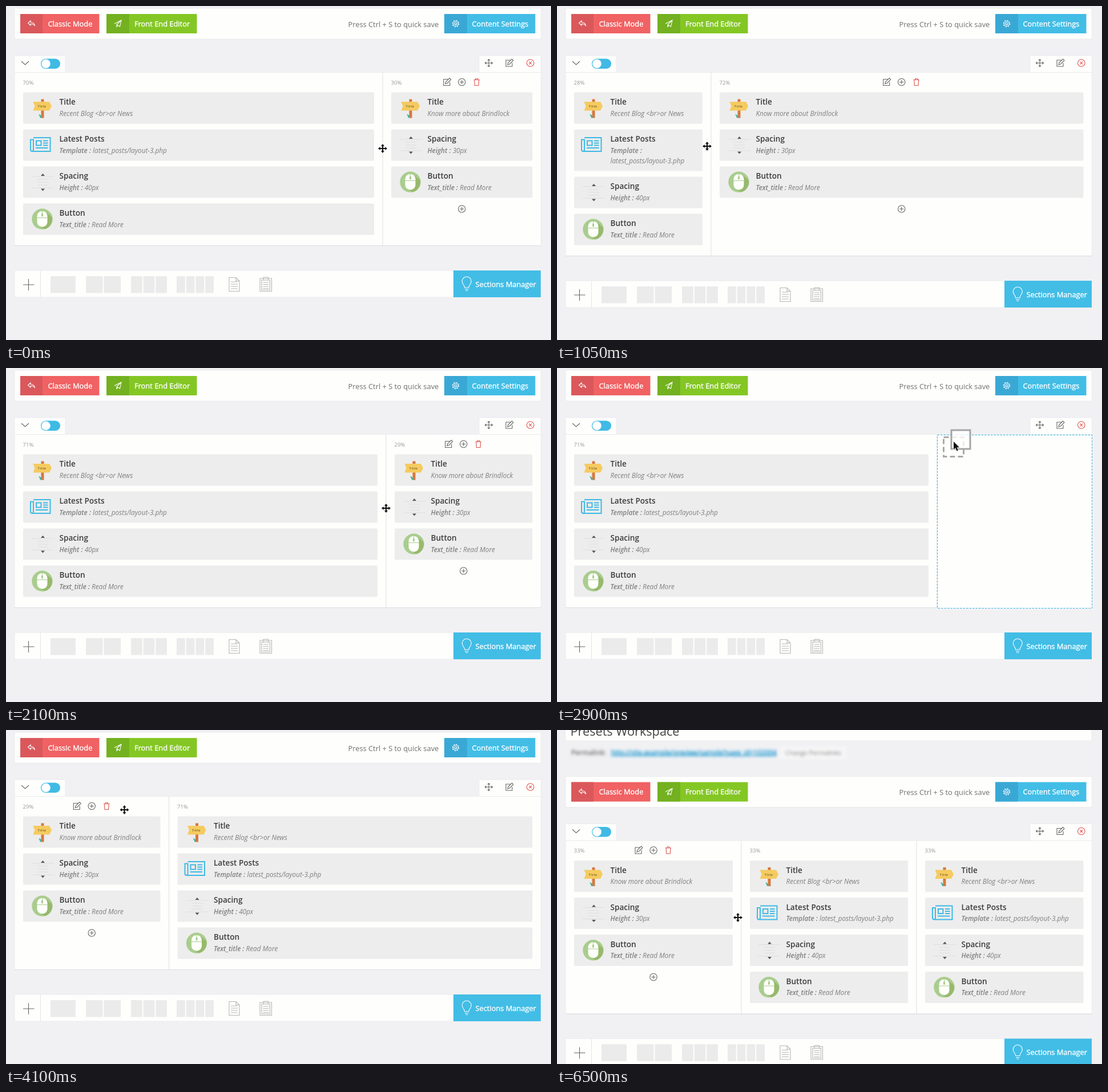
Animation of 955x586 px, one loop 6550 ms. Source, as an HTML page:

```html
<!DOCTYPE html>
<html lang="en">
<head>
<meta charset="utf-8">
<title>Section builder</title>
<style>
html, body { margin: 0; width: 100%; height: 100%; overflow: hidden; background: #f1f1f4; }
svg { display: block; width: 955px; height: 586px; font: 12.85px "Open Sans", sans-serif; }
.panel { fill: #fefefd; stroke: #ebebee; }
.line { fill: none; stroke: #666; stroke-width: 1.1; }
.white { stroke: #fff; }
.red { stroke: #e0544f; }
.pale { stroke: #b5b5b5; }
.label { fill: #fff; stroke: #fff; stroke-width: .35; }
.name { font-size: 13.6px; font-weight: 600; fill: #3c3c3e; }
.note { font-size: 11.75px; font-style: italic; fill: #808080; }
.note tspan { font-weight: 600; }
.note .value { font-weight: 400; }
.share { font-size: 9.6px; fill: #999; }
.cursor { stroke: #fff; stroke-width: 1.6; paint-order: stroke; fill: #111; }
</style>
</head>
<body>
<svg viewBox="0 0 955 586">
  <defs>
    <filter id="blur" x="-10%" y="-80%" width="120%" height="260%"><feGaussianBlur stdDeviation="2.4"/></filter>
    <path id="edit" class="line" d="M2-5H-6V6H5V0M-3 3L-2-.5 4.5-7 7-4.5 .5 2Z"/>
    <g id="add" class="line"><circle r="6.2"/><path d="M-3.5 0H3.5M0-3.5V3.5"/></g>
    <path id="trash" class="line red" d="M-5-4H5M-2-4V-6H2V-4M-4-4L-3.3 6H3.3L4-4"/>
    <path id="arrows" class="line" d="M-6.5 0H6.5M0-6.5V6.5M-2-4.5L0-6.5 2-4.5M-2 4.5L0 6.5 2 4.5M-4.5-2L-6.5 0-4.5 2M4.5-2L6.5 0 4.5 2"/>

    <!-- item icons, placed from the item's top left corner -->
    <g id="sign">
      <path fill="#d6783e" d="M31.5 12h5v33h-5z"/>
      <path fill="#f5cb60" d="M17.5 16.5H46L50 24 46 32H17.5L20.5 24Z"/>
      <path fill="#42b3a0" d="M27 38l4 2 2 4-3 1-1-3z"/>
      <text x="25.5" y="26.7" font-size="6" font-weight="600" fill="#785d28" letter-spacing=".5">Title</text>
    </g>
    <g id="news" fill="none" stroke="#3fb9e5" stroke-width="2">
      <path d="M18 14.5H47.5V38.5H16Q13 38.5 13 35.5V18H18V35.5Q18 38.5 15.5 38.5"/>
      <path d="M23 20H31.500V28H23ZM35 20H43.500M35 24H43.500M35 28H43.500M22 32.500H43.500"/>
    </g>
    <g id="gap">
      <path stroke="#dededf" d="M15 17.5H54M25 22.5H44M25 27.5H44M25 32.5H44M15 37.5H54"/>
      <path fill="#555" d="M31 16.5L34.5 12.5 38 16.5ZM31 39L34.5 43 38 39Z"/>
    </g>
    <g id="mouse">
      <circle cx="33.5" cy="27.3" r="18.2" fill="#a9cd8e"/>
      <path fill="#97b96c" d="M41 16L50.5 24A18.2 18.2 0 0 1 38 45L27 39Z"/>
      <rect x="24.5" y="13.5" width="18" height="27.5" rx="8.5" fill="#fefefa"/>
      <path fill="none" stroke="#a9cd8e" d="M33.5 13.5V18M24.5 25H42.5"/>
      <rect x="32" y="17" width="3" height="6" rx="1.5" fill="#a9cd8e"/>
    </g>

    <!-- pointers -->
    <path id="move" class="cursor" d="M0-8L3-4.3H1.1V-1.1H4.3V-3L8 0 4.3 3V1.1H1.1V4.3H3L0 8-3 4.3H-1.1V1.1H-4.3V3L-8 0-4.3-3V-1.1H-1.1V-4.3H-3Z"/>
    <g id="hand" stroke="#222" stroke-width="1.2">
      <path fill="#fff" d="M-4-7Q-2.5-9-1-7V-2L5-1Q7 0 6.5 4L5 9H-2L-6.5 2Q-6.5-.5-4 1Z"/>
      <path d="M-1-2V2M1.500-1.500V2M4-1V2M-1 4.500V7M1.500 4.500V7M4 4.500V7"/>
    </g>
    <g id="drag">
      <rect x="-19.5" y="-15.5" width="35" height="34" fill="none" stroke="#aaa" stroke-width="3" stroke-dasharray="9 5"/>
      <rect x="-6" y="-28" width="33" height="33" fill="#fff" fill-opacity=".8" stroke="#a5a5a5" stroke-width="3"/>
      <path class="cursor" d="M-2-8V6L1.2 3 3.5 8.5 6 7.4 3.7 2.2H8Z"/>
    </g>
  </defs>

  <g id="page">
    <rect class="panel" x="14.5" y="-100" width="922.5" height="41.5"/>
    <text x="23.5" y="-68" font-size="21.7" fill="#444">Presets Workspace</text>
    <g filter="url(#blur)" font-size="11.8">
      <rect x="390" y="-49" width="117" height="23" fill="#f6f6f7"/>
      <text x="25" y="-34" font-weight="600" fill="#666">Permalink:</text>
      <text x="95" y="-34" fill="#239bd0" stroke="#239bd0" stroke-width=".5" text-decoration="underline">http://site.example/preview/sample?page_id=102004</text>
      <text x="400" y="-34" font-size="11" fill="#666">Change Permalinks</text>
    </g>

    <rect class="panel" x="15" y="4" width="922.5" height="54"/>
    <path fill="#f06263" d="M25 14h138.5v34H25z"/><path fill="#da585b" d="M25 14h39v34H25z"/>
    <path fill="#84c724" d="M176 14h158.5v34H176z"/><path fill="#73b120" d="M176 14h40v34h-40z"/>
    <path fill="#42bde6" d="M768 14h159.5v34H768z"/><path fill="#3aa8d5" d="M768 14h40v34h-40z"/>
    <path class="line white" d="M43 26L38.5 30 43 34V31.5Q48 31 50.5 35 50 29 43 28.5Z"/>
    <path class="line white" d="M190 31L202 25 199.5 36 195.5 33.5 194 37V32.5L202 25"/>
    <g class="line white"><circle cx="788" cy="31" r="2"/><circle cx="788" cy="31" r="4.5"/><circle cx="788" cy="31" r="5.8" stroke-dasharray="2 2.55"/></g>
    <g class="label">
      <text x="73.5" y="35.5">Classic Mode</text>
      <text x="225" y="35.5">Front End Editor</text>
      <text x="816.5" y="35.5">Content Settings</text>
    </g>
    <text x="599.5" y="36.5" fill="#707070">Press Ctrl + S to quick save</text>

    <g id="section"></g>

    <g id="footer">
      <rect class="panel" x="15" y="464" width="922" height="47"/>
      <path stroke="#e6e6e8" d="M60.5 464V511"/>
      <path class="line" d="M30 489H49.5M39.5 479V499"/>
      <g id="layouts" fill="#ebebeb"></g>
      <path class="line pale" d="M391 476.5H403L409 482.5V500.5H391ZM403 476.5V482.5H409M394 484H405M394 488H406M394 492H406M394 496H406"/>
      <path class="line pale" d="M445 478H465.5V500.5H445ZM448 481H462.5V498H448ZM451 476H459.5V481H451ZM450.5 485H460M450.5 488.5H460M450.5 492H460M450.5 495.5H460"/>
      <path fill="#42bde6" d="M784 464h153v47H784z"/>
      <path class="line white" d="M803.5 494Q803.5 491 801 488A8 8 0 1 1 813.5 488Q811 491 811 494ZM804 497H810.5M805.5 499.5H809"/>
      <text class="label" x="822.5" y="492.5">Sections Manager</text>
    </g>
  </g>
  <g id="pointer"></g>
</svg>
<script>
const LOOP = 6550, LEFT = 15, RIGHT = 937.5, TOP = 117;
const $ = id => document.getElementById(id);
const use = (id, x, y) => `<use href="#${id}" x="${x}" y="${y}"/>`;

const button = ['mouse', 'Button', 'Text_title', 'Read More'];
const posts = [
  ['sign', 'Title', '', 'Recent Blog &lt;br>or News'],
  ['news', 'Latest Posts', 'Template', 'latest_posts/layout-3.php'],
  ['gap', 'Spacing', 'Height', '40px'],
  button
];
const about = [
  ['sign', 'Title', '', 'Know more about Brindlock'],
  ['gap', 'Spacing', 'Height', '30px'],
  button
];

// [time, value, ...] rows, joined by straight lines
function along(rows, t) {
  const i = rows.findIndex(r => r[0] > t);
  if (i < 0) return rows[rows.length - 1].slice(1);
  if (!i) return rows[0].slice(1);
  const a = rows[i - 1], b = rows[i], k = (t - a[0]) / (b[0] - a[0]);
  return a.slice(1).map((v, n) => v + (b[n + 1] - v) * k);
}

const dividerPath = [[200, 660], [600, 480], [950, 290], [1050, 270], [1100, 263], [1250, 258],
  [1450, 290], [1650, 468], [1700, 488], [2050, 666]];
const pointerPath = [[2100, 666, 246], [2400, 666, 246], [2550, 697, 140], [2800, 697, 137],
  [2900, 697, 137], [3650, 190, 140], [3850, 190, 140], [4100, 207.5, 140], [4250, 207.5, 140],
  [4700, 150, 112], [5100, 76, 104], [5250, 76, 104], [5500, 123, 104], [5750, 123, 104],
  [6400, 300, 320], [6450, 317, 329]];

function item([icon, name, key, value], x, y, width) {
  const wrap = icon === 'news' && width < 268;
  const height = wrap ? 73 : 55;
  const tx = x + 63.5;
  const head = key && `<tspan>${key} :</tspan> `;
  const note = head + (wrap ? `<tspan class="value" x="${tx}" dy="18.5">${value}</tspan>` : value);
  return { height, html: `<rect x="${x}" y="${y}" width="${width}" height="${height}" rx="2" fill="#ededed"/>
    ${use(icon, x, y)}<text class="name" x="${tx}" y="${y + 21.5}">${name}</text>
    <text class="note" x="${tx}" y="${y + 41}">${note}</text>` };
}

function column(items, x0, x1, hover) {
  const mid = (x0 + x1) / 2;
  const share = Math.round((x1 - x0) / (RIGHT - LEFT) * 100);
  let y = 151.5;
  let html = `<text class="share" x="${x0 + 14.5}" y="137.5">${share}%</text>`;
  for (const entry of items) {
    const block = item(entry, x0 + 15, y, x1 - x0 - 30);
    html += block.html;
    y += block.height + 10;
  }
  if (hover) html += use('edit', mid - 26, 133.5) + use('add', mid, 133.5) + use('trash', mid + 26, 133.5) + use('add', mid, y + 9.5);
  return { html, bottom: y + 9.5 };
}

function header(open) {
  const extra = `<path class="line" d="M119 96.5H130M119 100.5H130M119 104.5H130M116 96.5H117.5M116 100.5H117.5M116 104.5H117.5
    M158 96H153V106H164V102M156 103Q157 97 164 97M161.5 94L165 97 161.5 100
    M191 94H196L200 98V106H191ZM196 94V98H200M203 97.5H208.5M205.7 95V100.5
    M236 96V94H241L245 98V104H241M233 96H238L241 99V106H233ZM238 96V99H241"/>`;
  return `<rect class="panel" x="15" y="87" width="${open ? 242 : 89}" height="30"/>
    <rect class="panel" x="829" y="87" width="108.5" height="30"/>
    <path class="line" d="M27 97L33.5 103 40 97"/>
    <rect x="61" y="92.5" width="34" height="17.5" rx="8.75" fill="#3fbae5"/><circle cx="70" cy="101.2" r="7.8" fill="#fff"/>
    ${use('arrows', 846, 100)}${use('edit', 882, 100)}
    <path class="line red" d="M912.5 100a6.3 6.3 0 1 0 12.6 0a6.3 6.3 0 1 0 -12.6 0M916.5 97.7L921.1 102.3M921.1 97.7L916.5 102.3"/>
    ${open ? extra : ''}`;
}

function draw(now) {
  const t = Math.floor(now % LOOP / 50) * 50;
  const dragging = t >= 2800 && t < 3850;
  const swapped = t >= 3300, tripled = t >= 5750;
  const divider = swapped ? 285.5 : t < 250 ? 660 : along(dividerPath, t)[0];
  const bounds = tripled ? [LEFT, 323, 630, RIGHT] : [LEFT, divider, RIGHT];
  const sets = tripled ? [about, posts, posts] : swapped ? [about, posts] : [posts, about];
  const hover = t < 2800 ? 1 : (t >= 3850 && t < 4700) || t >= 6450 ? 0 : -1;
  const held = dragging ? sets.indexOf(about) : -1;

  const cols = sets.map((set, i) => column(set, bounds[i], bounds[i + 1], i === hover));
  const bottom = Math.max(...cols.map(c => c.bottom));
  let html = header(t >= 4700 && t < 5750) +
    `<rect class="panel" x="15" y="${TOP - .5}" width="922.5" height="${bottom - TOP}"/>
     <path stroke="#dcdcdf" d="M15 ${bottom - .5}H937.5"/>`;
  cols.forEach((col, i) => {
    const x = bounds[i];
    if (i) html += `<path stroke="#e0e0e2" d="M${x} ${TOP}V${bottom}"/>`;
    if (i !== held) html += col.html;
  });
  if (held >= 0) html += `<rect x="${bounds[held] + .5}" y="117.5" width="${bounds[held + 1] - bounds[held] - .5}"
    height="${bottom - TOP}" fill="#fefefd" stroke="#36b7df" stroke-dasharray="3.5 2"/>`;
  $('section').innerHTML = html;

  const k = Math.min(1, Math.max(0, (t - 5900) / 300));
  $('page').setAttribute('transform', `translate(0 ${77.5 * k * k * (3 - 2 * k)})`);
  $('footer').setAttribute('transform', `translate(0 ${bottom - 421})`);

  const [x, y] = t < 250 ? [660, 250]
    : t < 2100 ? [along(dividerPath, t + 50)[0], Math.max(246, 250 - (t - 250) / 100)]
    : along(pointerPath, t);
  const kind = dragging ? 'drag' : t >= 4700 && t < 5800 ? 'hand' : 'move';
  $('pointer').innerHTML = use(kind, x, y);
  requestAnimationFrame(() => draw(performance.now()));
}

// one to four equal cells per layout
$('layouts').innerHTML = [[78, 44], [140, 61], [219, 63], [299, 65]].map(([x, w], n) => {
  const step = (w + 2) / (n + 1);
  return Array.from({ length: n + 1 }, (_, i) =>
    `<rect x="${x + i * step}" y="474" width="${step - 2}" height="29.5"/>`).join('');
}).join('');
draw(0);
</script>
</body>
</html>
```
